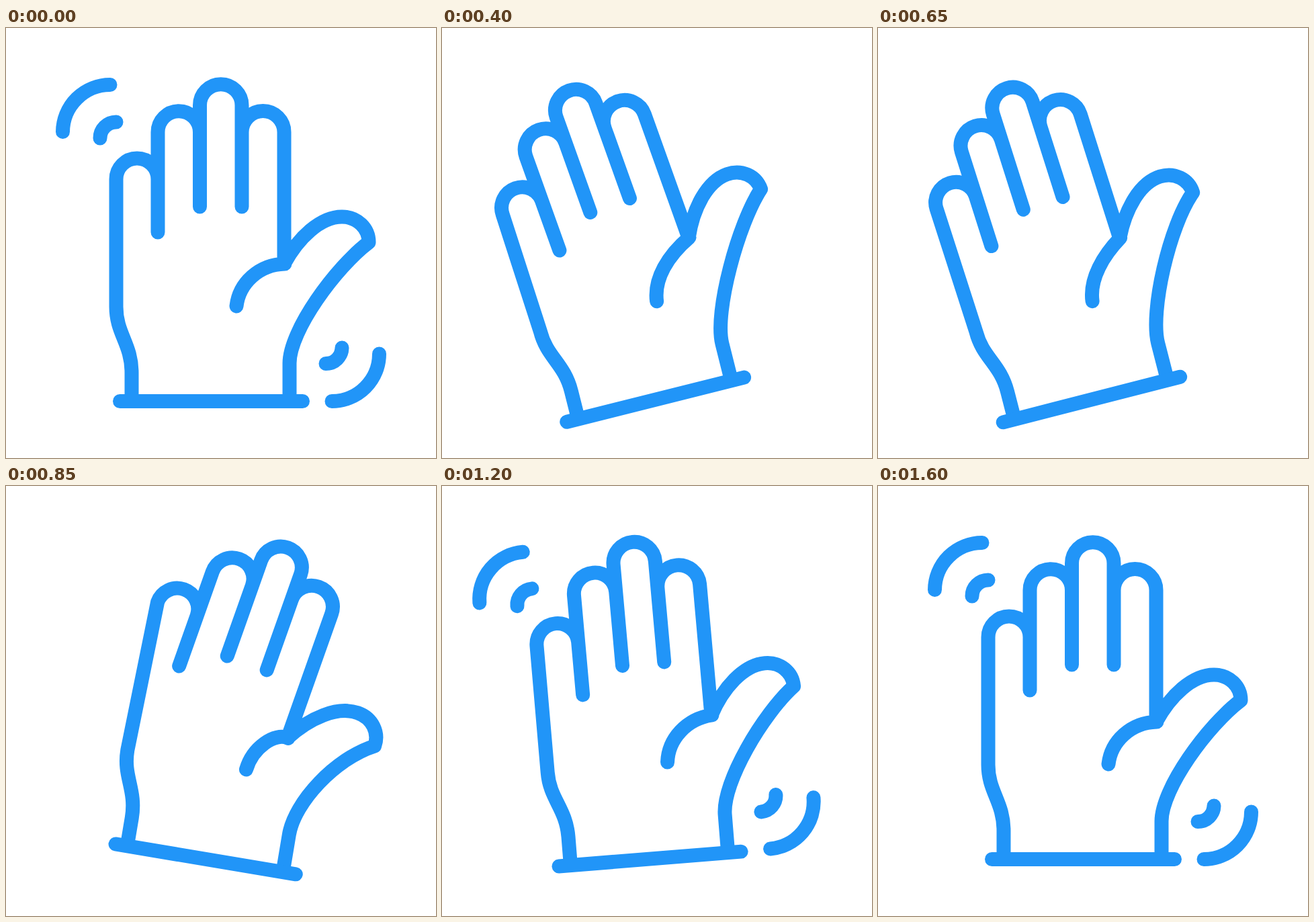
These frames come from a looping animation (640 by 640 pixels, 1.65 s). An HTML page:

```html
<!DOCTYPE html>
<html lang="en">
<head>
<meta charset="utf-8">
<title>Waving hand</title>
<style>
  html, body { margin: 0; width: 100%; height: 100%; overflow: hidden; background: #fff; }
  svg { display: block; width: 100%; height: 100%; }
</style>
</head>
<body>
<svg viewBox="0 0 640 640" fill="none" stroke="#2195f8" stroke-width="21" stroke-linecap="round" stroke-linejoin="round">
  <g id="hand">
    <path id="outline"/>
    <path d="M169.5 555.5H441.5"/>
    <g id="waves">
      <path id="left" d="M84.5 154.5A70.5 70.5 0 0 1 155 84.5M140 164A24 24 0 0 1 164 140"/>
      <path id="right" d="M555.5 485A70.5 70.5 0 0 1 485 555.5M500 476A24 24 0 0 1 476 499.5"/>
    </g>
  </g>
</svg>
<script>
const LOOP = 1650, STEP = 50, LEAD = 10;
const PIVOT = '302 505';

// Keys are [time, value] pairs.
const WRIST = [[200, 0], [525, -21], [560, -21], [860, 9.6], [1225, -4.8], [1575, 0]];
const BEND_LEFT = [[200, 0], [550, 1], [850, 0], [1200, 0.05], [1550, 0]];
const BEND_RIGHT = [[550, 0], [850, 1], [1200, 0]];
const WAVE_IN = [[1100, -0.6], [1200, 0]];
const WAVE_TILT = [[1225, -0.2], [1575, 0]];

const $ = id => document.getElementById(id);
const hand = $('hand'), outline = $('outline'), waves = $('waves');
const left = $('left'), right = $('right');

const linear = u => u;
const smooth = u => u * u * (3 - 2 * u);

function track(keys, t, ease) {
  if (t <= keys[0][0]) return keys[0][1];
  for (let i = 1; i < keys.length; i++) {
    const [t0, a] = keys[i - 1], [t1, b] = keys[i];
    if (t < t1) return a + (b - a) * ease((t - t0) / (t1 - t0));
  }
  return keys[keys.length - 1][1];
}

function spin(x, y, deg, cx, cy) {
  const a = deg * Math.PI / 180, c = Math.cos(a), s = Math.sin(a);
  return [cx + (x - cx) * c - (y - cy) * s, cy + (x - cx) * s + (y - cy) * c];
}

// Fingers and thumb bend together; the wrist end of the outline stays put.
function outlinePath(l, r) {
  const bent = (x, y) => {
    const a = spin(x, y, -9.8, 236, 356), b = spin(x, y, 10, 368, 252);
    return [x + l * (a[0] - x) + r * (b[0] - x), y + l * (a[1] - y) + r * (b[1] - y)];
  };
  const at = (x, y) => bent(x, y).map(v => v.toFixed(2)).join(' ');
  const cap = (x0, x1, y) => {
    const p = bent(x0, y), q = bent(x1, y);
    const rad = (Math.hypot(q[0] - p[0], q[1] - p[1]) / 2).toFixed(2);
    return `A${rad} ${rad} 0 0 1 ${at(x1, y)}`;
  };
  return [
    'M187 552V513C187 470 164 455 164 415L', at(164, 225), cap(164, 226, 225),
    'M', at(226, 304), 'L', at(226, 155), cap(226, 288.5, 155),
    'M', at(288.5, 266), 'L', at(288.5, 115), cap(288.5, 351, 115), 'L', at(351, 266),
    'M', at(351, 155), cap(351, 414, 155), 'L', at(414, 351),
    'C', at(435, 312), at(468, 281), at(500, 281),
    'C', at(523, 281), at(540, 298), at(540, 319),
    'C', at(491, 356), '422 450 422 499V552',
    'M', at(415, 351), 'C 376 352 347 380 343 414'
  ].join(' ');
}

function draw(t) {
  hand.setAttribute('transform', `rotate(${track(WRIST, t, smooth)} ${PIVOT})`);
  outline.setAttribute('d', outlinePath(track(BEND_LEFT, t, linear), track(BEND_RIGHT, t, linear)));

  const leaving = t < 400;
  waves.style.display = leaving || t >= 1150 ? '' : 'none';
  const k = leaving ? Math.pow(t / 200, 1.15) : track(WAVE_IN, t, smooth);
  const tilt = leaving ? 0 : track(WAVE_TILT, t, smooth);
  waves.setAttribute('transform', `rotate(${tilt} ${PIVOT})`);
  left.setAttribute('transform', `translate(${-23 * k} ${-21 * k})`);
  right.setAttribute('transform', `translate(${32 * k} ${27 * k})`);
}

const start = performance.now();
function frame() {
  const t = (performance.now() - start + LEAD) % LOOP;
  draw(Math.floor(t / STEP) * STEP);
  requestAnimationFrame(frame);
}
draw(0);
requestAnimationFrame(frame);
</script>
</body>
</html>
```
